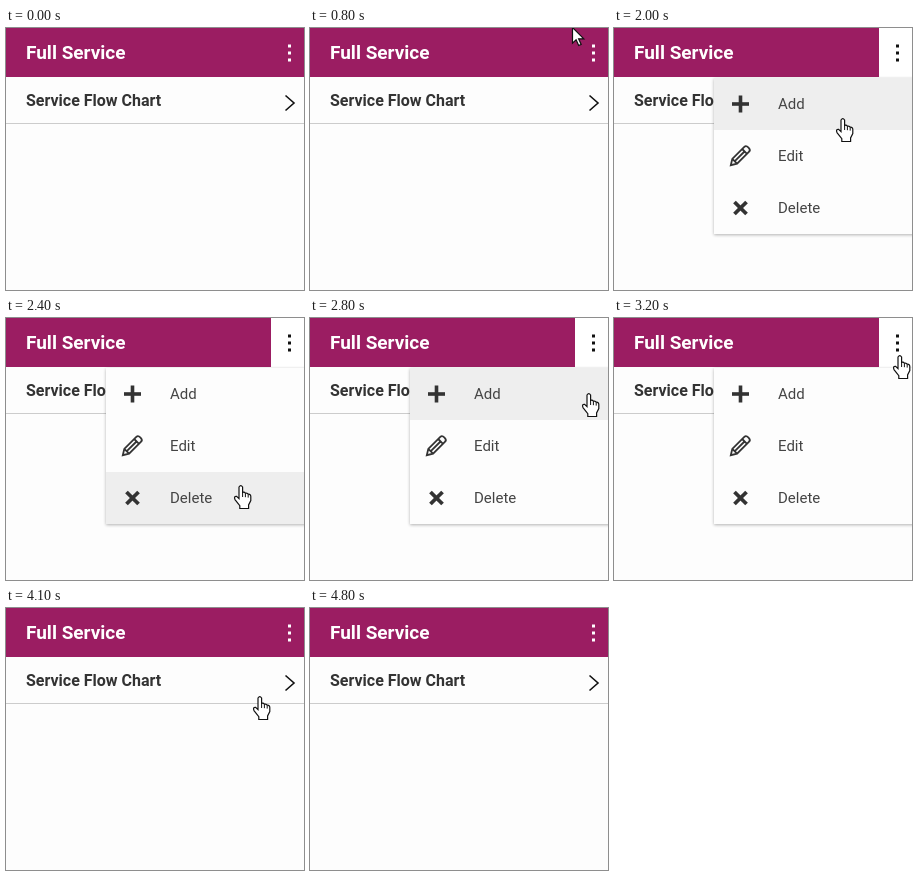
An HTML page with a canvas that plays this animation: 298 px wide and 262 px high, repeating every 5200 ms.

```html
<!DOCTYPE html>
<html lang="en">
<head>
<meta charset="utf-8">
<title>Menu demo</title>
<style>
  html, body { margin: 0; width: 100%; height: 100%; overflow: hidden; background: #fdfdfd; }
  canvas { display: block; width: 298px; height: 262px; }
</style>
</head>
<body>
<canvas id="stage"></canvas>
<script>
const W = 298, H = 262, LOOP = 5200, STEP = 100;
const canvas = document.getElementById('stage');
const ctx = canvas.getContext('2d');
const ratio = window.devicePixelRatio || 1;
canvas.width = W * ratio;
canvas.height = H * ratio;

const MENU = { x: 100, y: 50, row: 52, items: ['Add', 'Edit', 'Delete'] };
const MAGENTA = '#9b1d62';

// Keyframes: [time, values...]
const POINTER = [
  [500, 290, 107], [800, 262, -1], [1000, 290, 19], [1600, 290, 19],
  [1800, 268, 60], [2000, 229, 90], [2200, 226, 135], [2500, 240, 183],
  [2800, 279, 75], [3200, 286, 37], [3900, 286, 37], [4000, 276, 53],
  [4400, 188, 191], [4500, 188, 191], [4700, 185, 217]
];
const MENU_FADE = [
  [1000, 0], [1200, 0.5], [1300, 0.75], [1400, 0.92], [1500, 1],
  [3500, 1], [3600, 0.5], [3700, 0.2], [3800, 0]
];

const HAND = new Path2D('M5 2Q6.8-.6 8.6 2V7.4Q10.5 6.6 11.4 8.2Q13.4 7.6 14.2 9.2' +
  'Q16.8 9 16.8 11.6V15.5L14.6 20V23.5H5.8V20.6L1 14.6Q-.5 11.2 2.6 11.4L5 13.6Z');
const KNUCKLES = new Path2D('M8.6 7V12M11.4 8.4V12.2M14.2 9.4V12.6');
const ARROW = new Path2D('M.5.5V16.2L4.1 12.8L6.7 18.5L9.2 17.4L6.6 11.8H11.8Z');
const PENCIL = new Path2D('M-13 0L-7.5-3.4H9.5Q12-3.4 12 0Q12 3.4 9.5 3.4H-7.5Z' +
  'M-7.5-3.4V3.4M6.5-3.4V3.4M-7 0H6');
const CHEVRON = new Path2D('M279.5 67.5L288 75L279.5 82.5');

function sample(keys, t) {
  const next = keys.findIndex(key => key[0] >= t);
  if (next <= 0) return (next < 0 ? keys[keys.length - 1] : keys[0]).slice(1);
  const a = keys[next - 1], b = keys[next];
  const k = (t - a[0]) / (b[0] - a[0]);
  return a.slice(1).map((v, i) => v + (b[i + 1] - v) * k);
}

function rect(x, y, w, h, color) {
  ctx.fillStyle = color;
  ctx.fillRect(x, y, w, h);
}

function text(label, x, y, size, weight, color) {
  ctx.font = `${weight} ${size}px Roboto, sans-serif`;
  ctx.fillStyle = color;
  ctx.fillText(label, x, y);
}

function stroke(path, color, width) {
  ctx.strokeStyle = color;
  ctx.lineWidth = width;
  ctx.stroke(path);
}

function at(x, y, angle, draw) {
  ctx.save();
  ctx.translate(x, y);
  ctx.rotate(angle);
  draw();
  ctx.restore();
}

function cross(size, width) {
  rect(-size, -width / 2, size * 2, width, '#333');
  rect(-width / 2, -size, width, size * 2, '#333');
}

function drawPage(buttonAlpha, darkDots) {
  rect(0, 0, W, H, '#fdfdfd');
  rect(0, 0, W, 49, MAGENTA);
  rect(0, 95, W, 1, '#ccc');
  text('Full Service', 20, 31, 19, 700, '#fff');
  text('Service Flow Chart', 20, 78, 16, 700, '#333');
  stroke(CHEVRON, '#111', 1.6);
  rect(265, 0, 33, 49, `rgba(255,255,255,${buttonAlpha})`);
  for (const y of [18, 25, 32]) {
    rect(282, y - 1.5, 3, 3, darkDots ? '#111' : '#fff');
  }
}

function rowAt(x, y) {
  return x > MENU.x && y >= MENU.y ? Math.floor((y - MENU.y) / MENU.row) : -1;
}

function drawMenu(alpha, hovered) {
  const { x, y, row, items } = MENU;
  ctx.save();
  ctx.globalAlpha = alpha;
  ctx.shadowColor = 'rgba(0,0,0,.3)';
  ctx.shadowBlur = 3 * ratio;
  ctx.shadowOffsetY = ratio;
  rect(x, y, W - x + 10, row * items.length, '#fdfdfd');
  ctx.shadowColor = 'transparent';
  if (hovered >= 0 && hovered < items.length) {
    rect(x, y + hovered * row, W - x, row, '#eee');
  }
  items.forEach((label, i) => text(label, 164, y + i * row + 31, 15, 400, '#444'));
  at(126.5, 76, 0, () => cross(8.5, 3.6));
  at(126, 128, -Math.PI / 4, () => stroke(PENCIL, '#333', 1.8));
  at(126.5, 180, Math.PI / 4, () => cross(8.5, 3.8));
  ctx.restore();
}

function drawPointer(x, y, hand) {
  at(hand ? x - 7 : x, y, 0, () => {
    const shape = hand ? HAND : ARROW;
    ctx.fillStyle = '#fff';
    ctx.fill(shape);
    stroke(shape, '#111', 1.2);
    if (hand) stroke(KNUCKLES, '#111', 1);
  });
}

function render(t) {
  const [x, y] = sample(POINTER, t);
  const [menuAlpha] = sample(MENU_FADE, t);
  const visible = t >= 500 && t < 4800;
  const onButton = visible && x > 265 && y < 49;
  const onRow = y >= 49 && y < 95;
  const onMenu = menuAlpha > 0 && x > MENU.x && y >= MENU.y && y < 206;

  ctx.setTransform(ratio, 0, 0, ratio, 0, 0);
  drawPage(t < 3600 ? menuAlpha : 0, onButton || menuAlpha > 0);
  if (menuAlpha > 0) drawMenu(menuAlpha, rowAt(x, y));
  if (visible) drawPointer(Math.round(x), Math.round(y), onButton || onRow || onMenu);
}

const start = performance.now();
function tick() {
  const elapsed = (performance.now() - start) % LOOP;
  render(Math.floor(elapsed / STEP) * STEP);
  requestAnimationFrame(tick);
}
tick();
</script>
</body>
</html>
```
